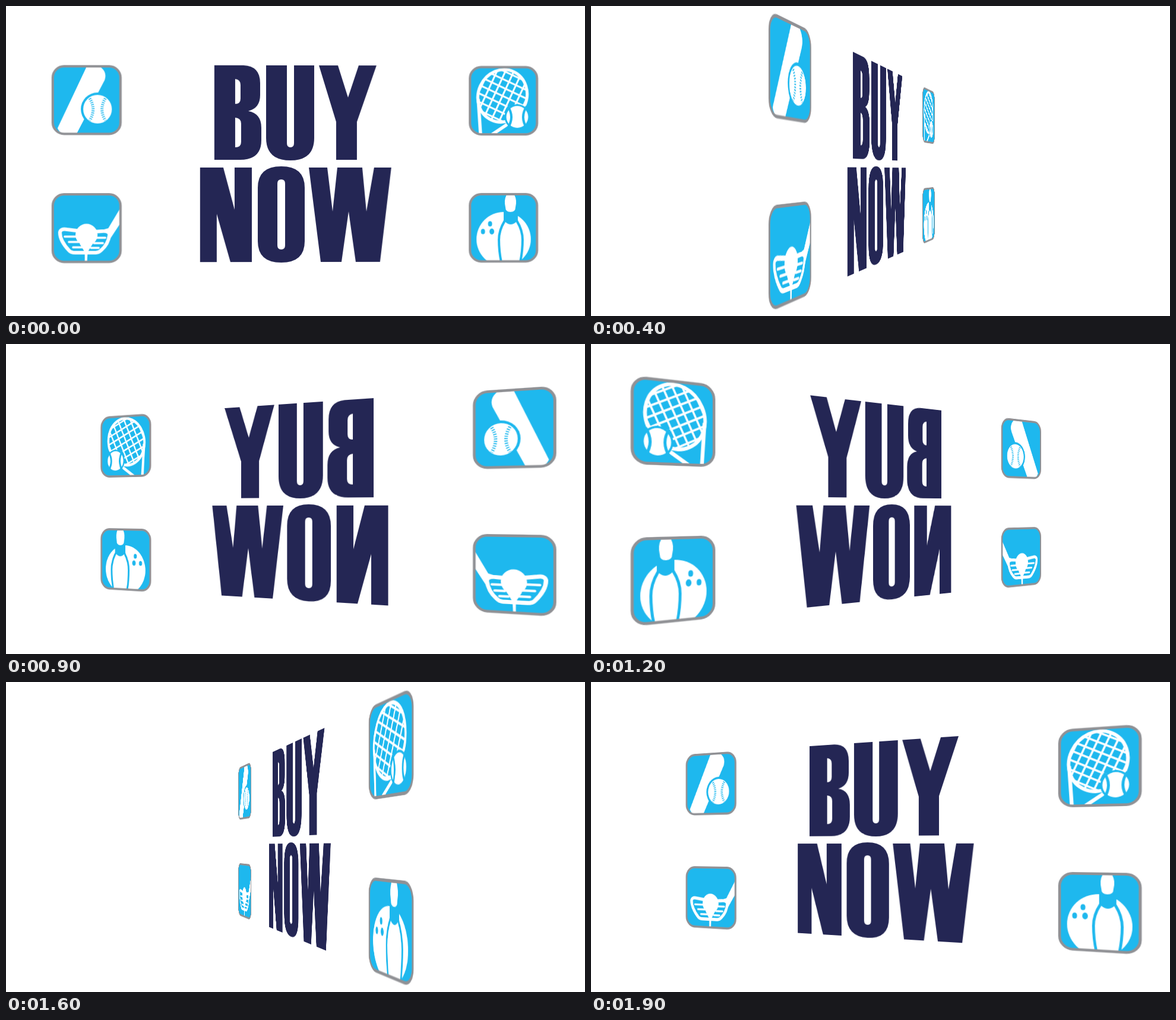
These frames come from a looping animation (975x522 px, 2000 ms). An HTML page:

```html
<!DOCTYPE html>
<html lang="en">
<head>
<meta charset="utf-8">
<title>Buy now</title>
<style>
  html, body { margin: 0; width: 100%; height: 100%; overflow: hidden; background: #fff; }
  #stage {
    position: relative; width: 975px; height: 522px; overflow: hidden;
    perspective: 1125px; perspective-origin: 487.5px 275px;
  }
  #sign { position: absolute; left: 0; top: 0; transform-origin: 487.5px 275px; }
  .w { fill: #fff; }
  .c { fill: #1eb8ee; }
  .wl { fill: none; stroke: #fff; }
  .cl { fill: none; stroke: #1eb8ee; }
  .border { fill: none; stroke: #909195; stroke-width: 4; }
</style>
</head>
<body>
<div id="stage">
<svg id="sign" width="975" height="522" viewBox="0 0 975 522" role="img" aria-label="BUY NOW">
  <defs>
    <clipPath id="inside"><rect x="2" y="2" width="113.5" height="113.5" rx="19"/></clipPath>
    <clipPath id="strings"><ellipse rx="41" ry="45"/></clipPath>
    <rect id="tile" x="2" y="2" width="113.5" height="113.5" rx="19"/>
  </defs>

  <g id="lettering" fill="#242654" fill-rule="evenodd">
    <!-- B U Y -->
    <path d="M351 100H400Q428 101 428 130V150Q428 172 408 177Q430 181 430 205V226Q430 259 394 259H351Z
             M386 123V165Q395 165 395 156V133Q395 124 386 123Z
             M386 188V238Q396 238 396 229V198Q396 189 386 188Z"/>
    <path d="M438 100H473V231Q473 238 479 238Q485 238 485 231V100H519V222Q519 260 479 260Q438 260 438 222Z"/>
    <path d="M527 100H559L576 154L594 100H624L591 195V259H556V195Z"/>
    <!-- N O W -->
    <path d="M327 272H366L385 343V272H414V431H378L355 350V431H327Z"/>
    <path d="M424 306Q424 270 463.5 270Q503 270 503 306V396Q503 432 463.5 432Q424 432 424 396Z
             M457 299V403Q457 410 463.5 410Q470 410 470 403V299Q470 292 463.5 292Q457 292 457 299Z"/>
    <path d="M510 272H541L550 346L558 272H600L607 346L620 272H649L630 431H589L577 346L565 431H530Z"/>
  </g>

  <!-- baseball -->
  <g transform="translate(78 100)">
    <use href="#tile" class="c"/>
    <g clip-path="url(#inside)">
      <path class="w" d="M59 2L10 106Q14 115 22 117H41L89 25Q93 13 84 5L80 2Z"/>
      <circle class="c" cx="77" cy="74" r="28"/>
      <circle class="w" cx="77" cy="74" r="24"/>
      <path class="cl" stroke-width="5" stroke-dasharray="1.5 2" d="M64 56Q75 74 64 93M90 56Q79 74 90 93"/>
    </g>
    <use href="#tile" class="border"/>
  </g>

  <!-- golf -->
  <g transform="translate(78 315)">
    <use href="#tile" class="c"/>
    <g clip-path="url(#inside)">
      <path class="w" d="M117 22L95 59L84 62L98 77L117 48Z"/>
      <path class="c" stroke="#fff" stroke-width="6" d="M14 66Q15 59 26 61Q60 66 84 64Q97 63 97 70Q95 86 83 96Q79 100 74 100H40Q32 100 29 96Q14 80 14 66Z"/>
      <path class="wl" stroke-width="3.5" stroke-linecap="round" d="M22 73H44M73 75H90M29 82H46M71 84H86M36 91H52M66 92H79"/>
      <circle class="w" cx="58.5" cy="70" r="18.5"/>
      <path class="w" d="M47 85H69L61 98Q60 101 59.5 117H55.5Q56 101 55 98Z"/>
    </g>
    <use href="#tile" class="border"/>
  </g>

  <!-- tennis -->
  <g transform="translate(780 100.5)">
    <use href="#tile" class="c"/>
    <g clip-path="url(#inside)">
      <path class="wl" stroke-width="5.5" d="M16 56L20 117M72 94L36 118"/>
      <g transform="translate(57 50.5) rotate(25)">
        <path id="grid" class="wl" stroke-width="3" clip-path="url(#strings)"/>
        <ellipse class="wl" stroke-width="5" rx="41" ry="45"/>
      </g>
      <circle class="c" cx="82" cy="86" r="21.5"/>
      <circle class="w" cx="82" cy="86" r="18.5"/>
      <path class="cl" stroke-width="4" d="M66 68Q78 86 66 105M98 68Q86 86 98 105"/>
    </g>
    <use href="#tile" class="border"/>
  </g>

  <!-- bowling -->
  <g transform="translate(780 315)">
    <use href="#tile" class="c"/>
    <g clip-path="url(#inside)">
      <circle class="w" cx="59" cy="78" r="46"/>
      <g class="c">
        <ellipse cx="36" cy="52" rx="3.5" ry="4.5"/>
        <ellipse cx="24" cy="65" rx="3.5" ry="4.5"/>
        <ellipse cx="39" cy="65" rx="4" ry="5"/>
        <path d="M59 28V46Q49 62 49 79Q49 98 53 117H89Q93 98 93 79Q93 62 83 46V28Z"/>
      </g>
      <path class="w" d="M64 3Q59 12 62 24Q62 32 70.5 32Q79 32 79 24Q82 12 77 3Z"/>
      <path class="w" d="M62 49Q71 57 80 49Q89 64 89 79Q89 98 85 117H57Q53 98 53 79Q53 64 62 49Z"/>
    </g>
    <use href="#tile" class="border"/>
  </g>
</svg>
</div>
<script>
  const LOOP = 2000, STEP = 100;
  const sign = document.getElementById('sign');

  let strings = '';
  for (let p = -39; p < 45; p += 13) strings += `M${p} -45V45M-45 ${p}H45`;
  document.getElementById('grid').setAttribute('d', strings);

  // Thirty poses of 12 degrees per turn, shown in twenty steps.
  function draw(now) {
    const step = Math.floor((now % LOOP) / STEP);
    const angle = 0.5 + 12 * Math.floor(step * 1.5);
    sign.style.transform = `rotateY(${angle}deg)`;
  }

  const start = performance.now();
  function tick() {
    draw(performance.now() - start);
    requestAnimationFrame(tick);
  }
  tick();
</script>
</body>
</html>
```
